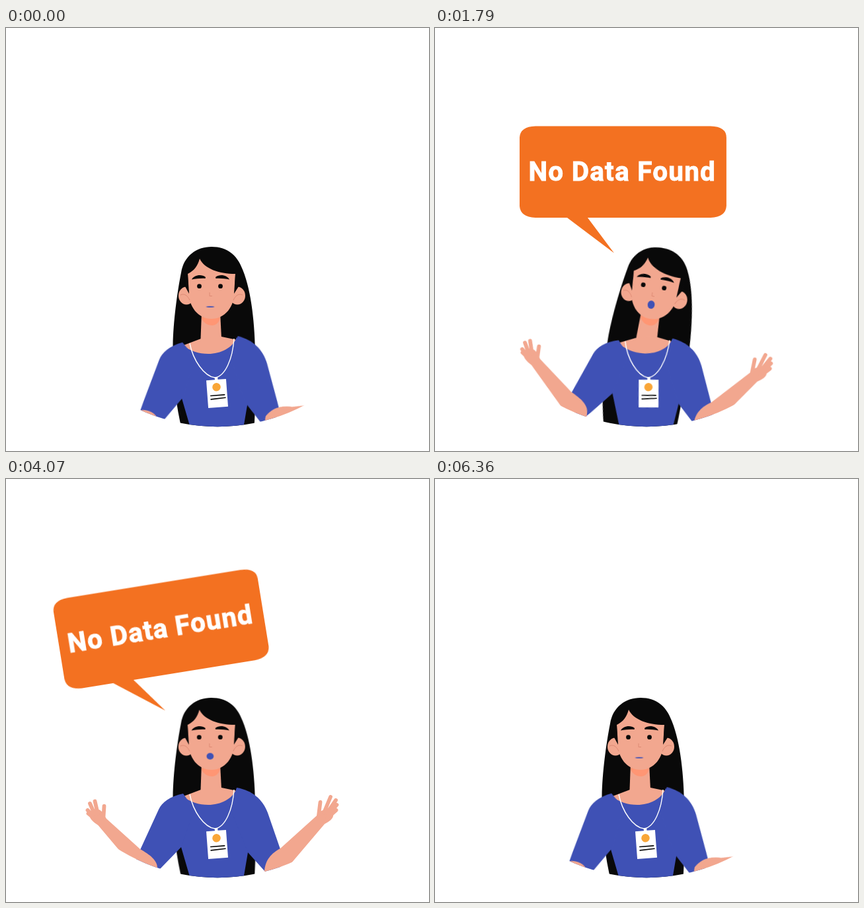
Recreate the animation shown at these times as an HTML page without scripts. Size 640x640 px, loop 6430 ms.

```html
<!DOCTYPE html>
<html lang="en">
<head>
<meta charset="utf-8">
<title>No Data Found</title>
<style>
html, body { margin: 0; width: 100%; height: 100%; overflow: hidden; background: #fff; }
svg { display: block; width: 100%; height: 100%; }

.skin { fill: #f2a78f; }
.hair { fill: #090909; }
.shirt { fill: #3f51b5; }
.fingers { fill: none; stroke: #f2a78f; stroke-width: 5.8; stroke-linecap: round; }
.fine { fill: none; stroke: #dd8a74; stroke-width: 1; }
.cord { fill: none; stroke: #fff; stroke-width: 1.4; }
.print { fill: none; stroke: #090909; stroke-width: 1.6; stroke-linecap: round; }
.bubble path { fill: #f37121; }
.bubble text { fill: #fff; stroke: #fff; stroke-width: .9; font: 700 40.5px Roboto, sans-serif; letter-spacing: 1.2px; }

.lean, .level, .nod, .mouth, .sleeve, .forearm, .bubble {
  animation: 6430ms cubic-bezier(.37, 0, .63, 1) infinite;
}

/* The torso leans; .level cancels the turn at the neck so the head only travels. */
.lean { --turn: 4.5deg; transform-origin: 320px 600px; animation-name: lean; }
.level { --turn: -4.5deg; transform-origin: 310px 467px; animation-name: lean; }
@keyframes lean {
  0%, 1%, 56%, 65.3%, 97.2%, 100% { transform: rotate(0deg); }
  18.7%, 28.9%, 77.8%, 84% { transform: rotate(var(--turn)); }
}

.nod { transform-origin: 310px 467px; animation-name: nod; }
@keyframes nod {
  0%, 12.4%, 56%, 62.2%, 99.5%, 100% { transform: rotate(0deg); }
  19.4% { transform: rotate(-.6deg); }
  27.8%, 28.9% { transform: rotate(9deg); }
  69.7% { transform: rotate(-3.6deg); }
  78.8% { transform: rotate(.7deg); }
  82.4% { transform: rotate(1.2deg); }
}

.mouth { transform-origin: 309px 422.4px; animation-name: talk; }
@keyframes talk {
  0%, 10.9%, 84%, 100% { transform: scale(1.12, .15); }
  19.4% { transform: scale(1, 1); }
  40% { transform: scale(1, .92); }
  63.3% { transform: scale(1.02, .76); }
  78.8% { transform: scale(1.06, .36); }
}

.left { animation-name: raise-left; }
.right { animation-name: raise-right; }
.sleeve.left { --rest: rotate(-4deg); transform-origin: 262px 490px; }
.sleeve.right { --rest: rotate(4deg); transform-origin: 362px 490px; }
.forearm.left { --rest: translate(-7px, -1px) rotate(-76deg); transform-origin: 212px 593px; }
.forearm.right { --rest: translate(6px, 0) rotate(32deg); transform-origin: 408px 594px; }
@keyframes raise-left {
  0%, 2.3%, 90.2%, 100% { transform: var(--rest); }
  14%, 79% { transform: none; }
}
@keyframes raise-right {
  0%, 7%, 88.6%, 100% { transform: var(--rest); }
  17.9%, 78.8% { transform: none; }
}

.bubble { transform-origin: 298px 362px; animation-name: pop, fade; animation-timing-function: ease-in-out, linear; }
@keyframes pop {
  0%, 90.2%, 100% { transform: scale(0); }
  12.4% { transform: scale(0); animation-timing-function: ease-out; }
  20.1% { transform: scale(1.1); }
  22.5%, 78.8% { transform: scale(1); }
  81.5% { transform: scale(1.09); animation-timing-function: cubic-bezier(.32, 0, .67, 0); }
}
@keyframes fade {
  0%, 12.4%, 90%, 100% { opacity: 0; }
  22.7%, 79% { opacity: 1; }
}
</style>
</head>
<body>
<svg viewBox="0 0 640 640">
  <clipPath id="stage"><circle cx="320" cy="320" r="283.2"/></clipPath>

  <g clip-path="url(#stage)">
    <g class="lean">
      <!-- Hair and neck, behind the shirt -->
      <g class="level"><g class="nod">
        <path class="hair" d="M265 370C269 345 288 331 311 331C335 331 349 344 356 361C370 391 376 440 377 488C378 530 378 570 375 612H267C257 570 252 530 252.500 480C253 445 259 400 265 370Z"/>
        <path class="skin" d="M296 430H324L326 470L322 485H298L294.500 470Z"/>
        <path fill="#ff9674" d="M296 437H324C323 445 318 450 312 450C305 450 299 446 296 440Z"/>
      </g></g>

      <path class="skin" d="M266 481L295 470L310 468L326 467L350 472V496H270Z"/>
      <path class="shirt" d="M267 479C278 489 292 493 306 493C325 493 343 484 349 468L380 495L366 565L358 612H281L265 557L245 500Z"/>

      <g class="sleeve left">
        <path class="shirt" d="M268 476C248 480 236 489 231 500L203 561L196 577L222 600L234 589L265 557L285 500Z"/>
        <g class="forearm left">
          <path class="skin" d="M152 514L203 560C217 568 230 577 229 590C229 602 222 611 210 612L196 591L139.500 524C132 519 126 514 126 507C128 498 141 496 147 506Z"/>
          <path class="fingers" d="M139 507L134.500 487.500M134 507L127 491M131 509L123.500 501M133 513L124.500 506M147.500 511L148.500 495"/>
        </g>
      </g>

      <g class="sleeve right">
        <path class="shirt" d="M349 467C372 471 388 484 396 505L415 560L420 575L410 600L392 594L366 565L340 500Z"/>
        <g class="forearm right">
          <path class="skin" d="M470.500 509L415 559C402 566 392 576 391 594L400 612L420 595L482 522C492 517 498 511 494 504C487 498 474 500 470.500 509Z"/>
          <path class="fingers" d="M473 509L475.500 489M481 505L491 481M486 505L499 486M488 508L500.500 493M486 513L499.500 501"/>
        </g>
      </g>

      <path class="cord" d="M278 477C283 503 300 527 316 529C332 527 343 500 345 470"/>
      <g transform="translate(319.500 553) rotate(-4.200)">
        <path fill="#fff" d="M-2 -25H2.500V-21H15V21H-15V-21H-2Z"/>
        <circle cx="-.3" cy="-9.800" r="6.300" fill="#f9a638"/>
        <path class="print" d="M-10 2.700H11M-10 8.200L12 7.200"/>
      </g>

      <!-- Face -->
      <g class="level"><g class="nod">
        <ellipse class="skin" cx="273" cy="405" rx="12" ry="13.500"/>
        <ellipse class="skin" cx="350" cy="405" rx="12" ry="13.500"/>
        <path class="skin" d="M275 372C285 367 290 360 293 349C300 364 322 372 347 372L346 397C346 422 331 440 311 440C291 440 276 422 276 397Z"/>
        <path class="hair" d="M275 372L277 402L271 391L268 372ZM347 372L345 402L352 391L354 372Z"/>
        <path class="fine" d="M264 404C270 401 275 405 278 412M358 404C352 401 347 405 344 412M308 400V405.500H312"/>
        <path class="hair" d="M281 380.500C284 374.500 295 371.500 302 377L301.500 379C294 378.500 288 379.500 281 380.500ZM317 377C324 371.500 335 374.500 338 380.500C331 379.500 325 378.500 317.500 379Z"/>
        <circle class="hair" cx="292.500" cy="390.700" r="3.400"/>
        <circle class="hair" cx="324.500" cy="390.700" r="3.400"/>
        <ellipse class="mouth shirt" cx="309" cy="418.500" rx="5.300" ry="6.500"/>
      </g></g>
    </g>
  </g>

  <g class="lean"><g class="level"><g class="nod">
    <g transform="rotate(-9 318 540)">
      <g class="bubble">
        <path d="M153 148.500H418Q442 149 442 166V269Q441 286 418 287H232L272 340.500L201 287H153Q130 286 129 269V166Q130 149 153 148.500Z"/>
        <text x="142.500" y="231">No Data Found</text>
      </g>
    </g>
  </g></g></g>
</svg>
</body>
</html>
```
